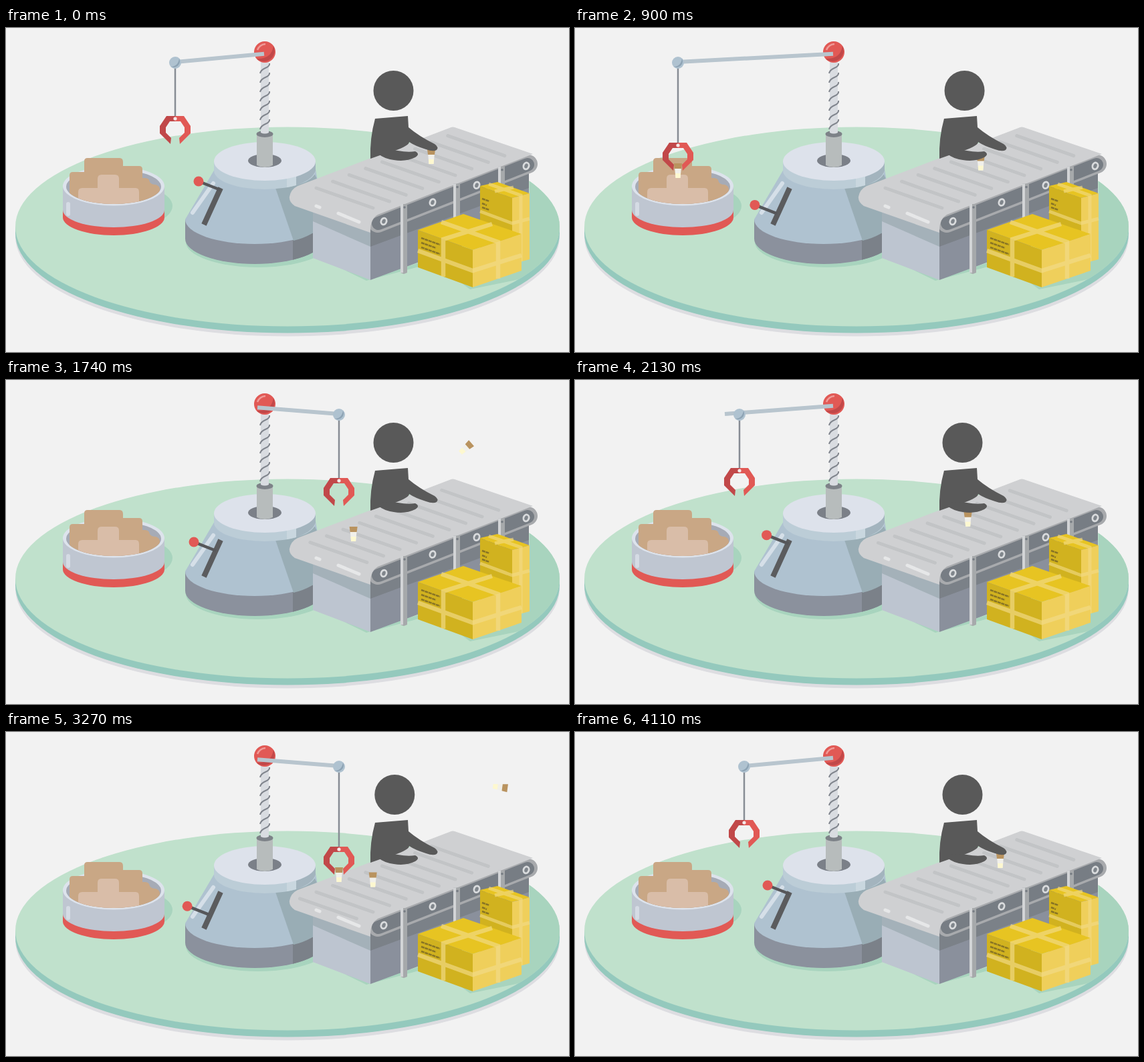
These frames come from a looping animation (842x486 px, 4140 ms). An HTML page:

```html
<!DOCTYPE html>
<html lang="en">
<head>
<meta charset="utf-8">
<title>Packing line</title>
<style>
html,body{margin:0;width:100%;height:100%;overflow:hidden;background:#f2f2f2}
svg{display:block;width:842px;height:486px}
</style>
</head>
<body>
<svg viewBox="0 0 842 486">
<defs>
  <clipPath id="floor"><ellipse cx="421" cy="298" rx="407" ry="149.500"/></clipPath>
  <clipPath id="tub"><path d="M85 150H240V238H232A71 26 0 0 1 90 238H85Z"/></clipPath>
  <clipPath id="base"><path d="M268 287V316A104 38 0 0 0 476 316V287Z"/></clipPath>
  <g id="cup">
    <path d="M-5 -5H5L3.5 11H-3.5Z" fill="#f1f0ea"/>
    <path d="M-4 4H4L3.5 11H-3.5Z" fill="#fdf8d0"/>
    <path d="M-6 -11H6L5 -3H-5Z" fill="#b9935f"/>
  </g>
</defs>

<!-- floor -->
<ellipse cx="421" cy="313" rx="407" ry="149.500" fill="#dddde1"/>
<path d="M14 298V308A407 149.500 0 0 0 828 308V298Z" fill="#94c9bd"/>
<ellipse cx="421" cy="298" rx="407" ry="149.500" fill="#c0e1cc"/>
<g fill="#a8d4be" clip-path="url(#floor)">
  <ellipse cx="173" cy="267" rx="76" ry="33"/>
  <ellipse cx="377" cy="321" rx="108" ry="38"/>
  <path d="M459 340L539 379L640 352L694 392L772 376L830 345V250L783 229V300L545 375Z"/>
</g>

<!-- tub -->
<path d="M85 240V284A76 27 0 0 0 237 284V240Z" fill="#e15955"/>
<path d="M85 238V273A76 26 0 0 0 237 273V238Z" fill="#bfc6d1"/>
<rect x="90" y="261" width="6" height="21" rx="3" fill="#d5dbe4"/>
<ellipse cx="161" cy="237" rx="76" ry="29.500" fill="#dde3ec"/>
<ellipse cx="161" cy="238" rx="71" ry="26" fill="#a6abb6"/>
<g clip-path="url(#tub)">
  <path d="M95 270V221Q95 216 100 216H117V200Q117 195 122 195H170Q175 195 175 201V207H199Q204 207 204 212V225H208Q214 225 215 231Q217 235 224 235Q230 237 230 242V270Z" fill="#c9a785"/>
  <path d="M108 270V246Q108 240 114 240H137V226Q137 220 143 220H163Q169 220 169 226V240H194Q199 240 199 246V270Z" fill="#d9bda8"/>
</g>

<!-- crane body -->
<g clip-path="url(#base)">
  <rect x="268" y="280" width="208" height="80" fill="#8b919d"/>
  <rect x="429" y="280" width="50" height="80" fill="#7b8189"/>
</g>
<path d="M312 212L268 287A104 37 0 0 0 476 287L463 212Z" fill="#afc2d0"/>
<path d="M403 240L430 319Q460 312 476 292V250L462 220Z" fill="#99adb5"/>
<path d="M311 200V214A76 28 0 0 0 463 214V200Z" fill="#bccdd7"/>
<path d="M420 222V239L434 236V222Z" fill="#c9d7df"/>
<path d="M434 222V236Q458 228 463 214V200Z" fill="#a3b4be"/>
<ellipse cx="387" cy="200" rx="76" ry="29" fill="#dde2eb"/>
<ellipse cx="387" cy="199" rx="25" ry="10" fill="#7b8088"/>
<path d="M375 159V206Q387 212 399 206V159Z" fill="#b7bcbc"/>
<ellipse cx="387" cy="159" rx="12.500" ry="5" fill="#7d8288"/>
<path d="M381 44V157Q387 160 393 157V44Z" fill="#d9dce1"/>
<g id="coils" fill="none" stroke="#80858d" stroke-width="2"></g>
<circle cx="387" cy="36" r="16" fill="#e15955"/>
<path d="M400 27A16 16 0 0 1 375 46Q397 47 400 27Z" fill="#c14849"/>
<path d="M376 33Q379 25 388 24" fill="none" stroke="#f09b98" stroke-width="2.500"/>
<path d="M310 233L279 277" stroke="#d5dfe8" stroke-width="6" stroke-linecap="round"/>
<path d="M321 240L296 295" stroke="#5b5c5e" stroke-width="8"/>
<g id="lever">
  <path d="M0 0L33 13" stroke="#56575a" stroke-width="4.500"/>
  <circle r="7.500" fill="#e15955"/>
</g>

<!-- conveyor -->
<path d="M545 300L782 215V290L545 378Z" fill="#8a909c"/>
<path d="M545 300L782 215V240L545 328Z" fill="#7b8188"/>
<path d="M459 272L545 303V378L459 345Z" fill="#bdc5d0"/>
<path d="M459 272L545 303V328L459 290Z" fill="#a4b1b9"/>
<path d="M556 293L781 204" stroke="#a8aaad" stroke-width="28" stroke-linecap="round"/>
<path d="M557 293L780 205" stroke="#777d84" stroke-width="20" stroke-linecap="round"/>
<path d="M663 150Q668 147 674 150L788 189L556 280Q544 287 545 307L432 267Q423 261 424 253Q426 242 436 237Z" fill="#cfd0d2"/>
<g id="slats" stroke="#c2c4c6" stroke-width="5" stroke-linecap="round"></g>
<path d="M464 267L469 269M497 278L528 291" stroke="#e6e7e8" stroke-width="5" stroke-linecap="round"/>
<g id="rollers" fill="#80868c" stroke="#d9dbdd" stroke-width="2.800"></g>
<g id="legs"></g>

<use id="beltCup" href="#cup"/>
<use id="thrownCup" href="#cup"/>

<!-- worker -->
<g fill="#595959">
  <circle id="head" cy="94" r="30"/>
  <path d="M552 136L601 132L602 149Q617 162 641 174Q648 179 644 183Q639 186 628 182Q612 177 603 171Q603 176 582 184L562 190L545 196Q544 165 552 136Z"/>
  <path id="frontArm"/>
</g>

<!-- parcels -->
<path d="M709 237L735 231L783 248L757 255Z" fill="#e7c422"/>
<path d="M709 237L757 255V354L709 336Z" fill="#d1b21f"/>
<path d="M757 255L783 248V347L757 354Z" fill="#efcf5b"/>
<path d="M709 275L757 293L783 286M731 245L759 239M722 234L770 251V350" fill="none" stroke="#f3dc89" stroke-width="5" opacity=".6"/>
<path d="M684 279L771 309L698 333L616 303Z" fill="#e7c422"/>
<path d="M616 303L698 333V389L616 359Z" fill="#d1b21f"/>
<path d="M698 333L771 309V364L698 389Z" fill="#efcf5b"/>
<path d="M654 373V317L727 294M651 291L736 321V376M616 334L698 364L771 341" fill="none" stroke="#f3dc89" stroke-width="6.500" opacity=".65"/>
<path d="M621 315L649 325M621 322L643 330M621 329L649 339M712 256L723 260M712 263L719 266M712 269L723 273" stroke="#887424" stroke-width="2.500" stroke-dasharray="5 .8"/>

<!-- crane arm -->
<path id="cable" stroke="#878c94" stroke-width="2.500"/>
<path id="arm" stroke="#b8c5ce" stroke-width="6"/>
<g id="pulley">
  <circle r="9" fill="#afc2d0"/>
  <path d="M6 -6A9 9 0 0 1 -6 6Q4 6 6 -6Z" fill="#8da3b4"/>
</g>
<g id="claw">
  <use id="heldCup" href="#cup" y="38"/>
  <path id="jaw" d="M0 -4H-13L-23 11V22L-7 38L-6 29L-14 21V13L-8 4H0Z" fill="#c14849"/>
  <path d="M0 -4H13L23 11V22L7 38L6 29L14 21V13L8 4H0Z" fill="#e15955"/>
  <circle r="2.600" fill="#f5e9e9"/>
</g>
</svg>
<script>
const LOOP = 4140, BELT = LOOP / 3, GAP = 24.6;
const HOME = 253, TUB = 154, DROP = 498;

const $ = id => document.getElementById(id);
const set = (id, attrs) => { for (const k in attrs) $(id).setAttribute(k, attrs[k]); };
const place = (id, x, y, turn = 0) => set(id, { transform: `translate(${x} ${y}) rotate(${turn})` });
const show = (id, on) => set(id, { visibility: on ? 'visible' : 'hidden' });

const ramp = (t, start, length) => Math.min(1, Math.max(0, (t - start) / length));
const glide = (t, start, length) => (1 - Math.cos(Math.PI * ramp(t, start, length))) / 2;
const slow = (t, start, length, power) => 1 - (1 - ramp(t, start, length)) ** power;

function repeat(id, list, draw) { $(id).innerHTML = list.map(draw).join(''); }
const range = n => [...Array(n).keys()];

repeat('coils', range(7), i => `<path d="M394 ${53 + i * 14}q1 4-6 7t-8 8"/>`);
repeat('slats', range(9), i => `<path d="M${464 + i * GAP} ${240 - i * 9.8}l85 30"/>`);
repeat('rollers', [565, 638, 704, 778], x => {
  const y = 290 - (x - 565) * 0.39;
  return `<ellipse cx="${x}" cy="${y}" rx="4" ry="5" transform="rotate(20 ${x} ${y})"/>`;
});
repeat('legs', [590, 669, 736], x => {
  const y = 264 - (x - 590) * 0.385, end = 367 - (x - 590) * 0.8;
  return `<path d="M${x} ${y}h10V${end}l-5 2-5-2Z" fill="#a6a9ab"/>
    <path d="M${x} ${y}h4V${end}h-4Z" fill="#d2d4d6"/>
    <circle cx="${x + 6}" cy="${y + 5}" r="1.800" fill="#777d84"/>`;
});

// Two trips from the tub to the belt, the second one quicker.
const clawX = t => HOME + (TUB - HOME) * glide(t, 150, 340)
  + (DROP - TUB) * (glide(t, 900, 746) - glide(t, 1804, 500) + glide(t, 2725, 545))
  + (HOME - DROP) * glide(t, 3420, 540);
const clawY = t => 136 + 40 * (glide(t, 480, 160) - glide(t, 1660, 140)
  + glide(t, 2290, 140) - glide(t, 3300, 120));
// The lever is pulled down quickly and creeps back up.
const leverDrop = t => 45 * (glide(t, 250, 290) - ramp(t, 540, 1690)
  + glide(t, 2570, 300) - ramp(t, 2900, 1210));

function drawCrane(t) {
  const x = clawX(t), y = clawY(t);
  const tip = Math.min(x, clawX(t + 24));
  const side = Math.max(-1, Math.min(1, (381 - x) / 50));
  set('arm', { d: `M${381 + 5 * side} ${40 - 1.3 * side}L${tip} 51` });
  set('cable', { d: `M${x} 52V${y}` });
  place('pulley', x, 52);
  place('claw', x, y);
  show('heldCup', (t > 700 && t < 1650) || (t > 2500 && t < 3290));
  const drop = leverDrop(t);
  place('lever', 288 - drop * 0.54, 230 + drop);
}

function drawBelt(t) {
  const phase = t % BELT;
  const shift = (4 * slow(phase, 300, 600, 1.6) % 1 || 1) * GAP - GAP;
  place('slats', shift, -shift * 0.4);

  const waiting = phase < 210;
  const travel = waiting ? 1 : slow(phase, 260, 1090, 1.75);
  show('beltCup', waiting || phase >= 260);
  place('beltCup', DROP + 138 * travel, 238 - 45 * travel);

  const drop = ramp(phase, 480, 240);
  show('thrownCup', phase >= 210 && phase < 720);
  place('thrownCup', 636 + 108 * ramp(phase, 210, 315),
    193 - 113 * slow(phase, 210, 270, 2) + 170 * drop * drop,
    180 * ramp(phase, 210, 555));
}

function drawWorker(t) {
  const lean = glide(t, 720, 560) - glide(t, 1240, 500) + glide(t, 2200, 500) - glide(t, 2800, 620);
  set('head', { cx: 579.5 + 13 * lean });
  const r = glide(t, 1130, 170) - glide(t, 1430, 170);
  const x = 612 + 16 * r, y = 185 - 6 * r, under = 11 * r;
  set('frontArm', { d: `M556 184Q575 182 586 ${184 - 6 * r}Q601 ${187 - 9 * r} ${x} ${y}
    Q${x + 8} ${y + 4} ${x} ${y + 9 + 3 * r}Q598 ${201 - under} 580 ${198 - under}Q565 ${196 - under} 556 188Z` });
}

function draw(t) {
  drawCrane(t);
  drawBelt(t);
  drawWorker(t);
}

const start = performance.now();
function tick() {
  draw((performance.now() - start) % LOOP);
  requestAnimationFrame(tick);
}
tick();
</script>
</body>
</html>
```
